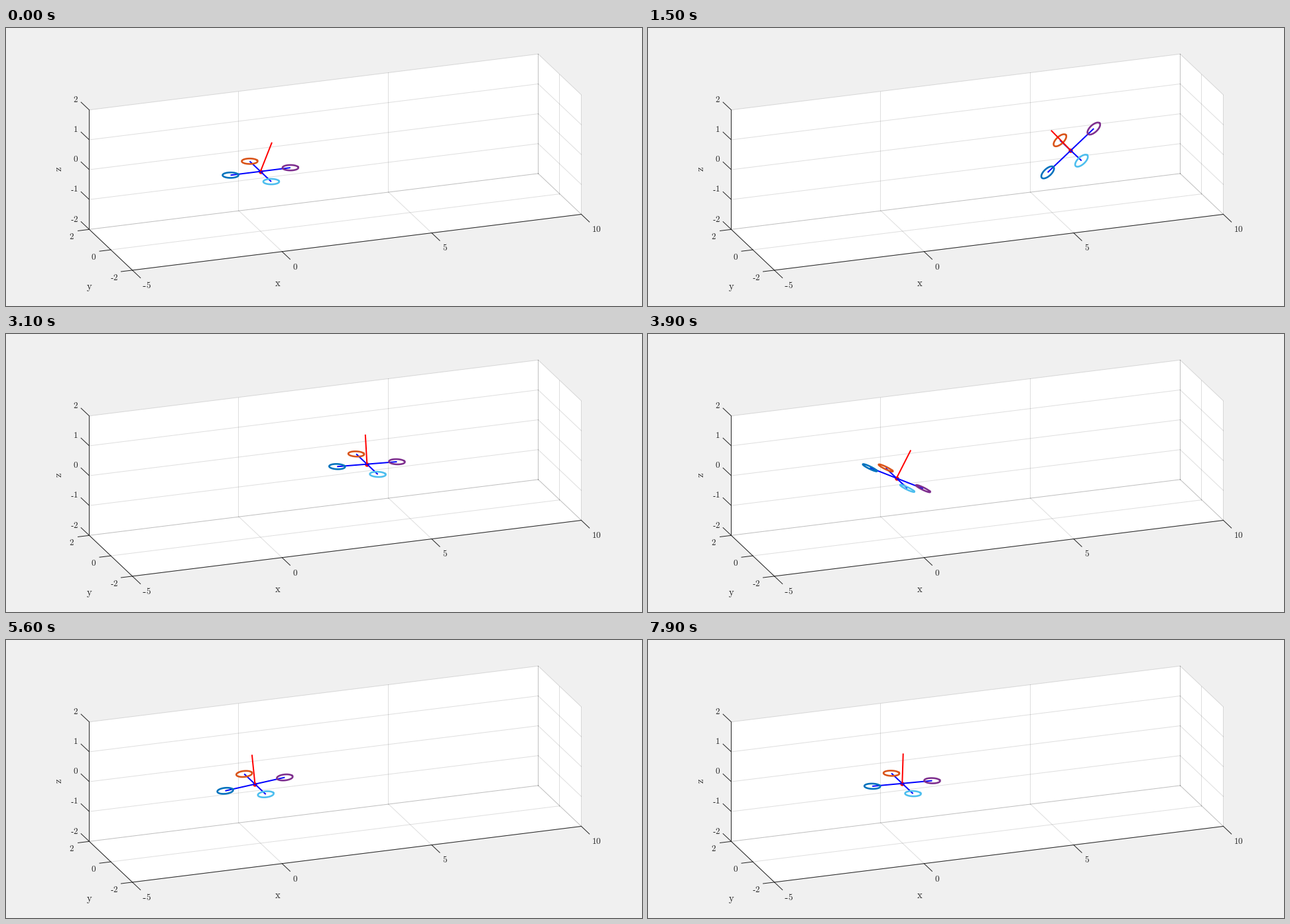
Animation of 959x420 px, one loop 8 s. Source, as a matplotlib script:

```python
import numpy as np
import matplotlib.pyplot as plt
from matplotlib.animation import FuncAnimation

W, H, DPI = 959, 420, 64
FRAMES, STEP = 80, 100
PX = 72 / DPI  # points per pixel

plt.rcParams["mathtext.fontset"] = "cm"

INK = "#262626"
GRID = (0.15, 0.15, 0.15, 0.15)
ORIGIN = np.array([383.7, 216.7])
AXES = np.array([[45.13, -5.63], [-16.25, -15.4], [0, -45.13]])


def project(points):
    """Orthographic view: (x, y, z) to stage pixels."""
    return ORIGIN + np.asarray(points, float) @ AXES


fig = plt.figure(figsize=(W / DPI, H / DPI), dpi=DPI, facecolor="#f0f0f0")
ax = fig.add_axes([0, 0, 1, 1])
ax.set(xlim=(0, W), ylim=(H, 0))
ax.axis("off")


def line(points, color, width, z=2, **kw):
    x, y = project(points).T
    if np.ptp(x) < 1e-6:
        x = x - 0.75  # upright lines snap down to whole pixels
    return ax.plot(x, y, color=color, lw=width * PX, zorder=z, **kw)[0]


def tick(start, delta):
    x, y = project(start)
    ax.plot([x, x + delta[0]], [y, y + delta[1]], color=INK, lw=PX, zorder=3)


def label(x, mid, value, align):
    """Number in roman type with a short hyphen as its sign."""
    size, base = 13.3, mid + 4.4
    digits = str(abs(value))
    if value < 0:
        if align == "left":
            x += 0.333 * size
            left = x
        else:
            left = x - 0.5 * size * len(digits)
        ax.plot([left - 4.3, left - 0.8], [base - 2.9] * 2, color=INK, lw=PX,
                solid_capstyle="butt")
    ax.text(x, base, rf"$\mathrm{{{digits}}}$", fontsize=size * PX, color=INK,
            ha=align, va="baseline")


# Panes
for pane in (
    [(-5, 2, -2), (10, 2, -2), (10, 2, 2), (-5, 2, 2)],
    [(-5, 2, -2), (10, 2, -2), (10, -2, -2), (-5, -2, -2)],
    [(10, 2, -2), (10, -2, -2), (10, -2, 2), (10, 2, 2)],
):
    ax.add_patch(plt.Polygon(project(pane), fc="white", ec="none", zorder=0))

# Grid, ticks and numbers
for x in range(-5, 11, 5):
    line([(x, 2, 2), (x, 2, -2)], GRID, 1)
    line([(x, 2, -2), (x, -2, -2)], GRID, 1)
    tick((x, -2, -2), (12.2, 11.6))
    label(431.9 + 45.15 * x, 360.2 - 5.62 * x, x, "left")
for y in range(-2, 3, 2):
    line([(-5, y, -2), (10, y, -2)], GRID, 1)
    line([(10, y, -2), (10, y, 2)], GRID, 1)
    tick((-5, y, -2), (-17, 2.1))
    label(135.8 - 16.4 * y, 345.2 - 15.5 * y, y, "right")
for z in range(-2, 3):
    line([(-5, 2, z), (10, 2, z)], GRID, 1)
    line([(10, 2, z), (10, -2, z)], GRID, 1)
    tick((-5, 2, z), (-12.4, -11.7))
    label(108.8, 197.8 - 45.2 * z, z, "right")

# Rulers
corners = [(-5, 2, 2), (-5, 2, -2), (-5, -2, -2), (10, -2, -2)]
for edge in zip(corners, corners[1:]):
    line(edge, INK, 1, 3)

name = dict(fontsize=14.7 * PX, color=INK, ha="center")
ax.text(410, 389.8, r"$\mathrm{x}$", va="baseline", **name)
ax.text(126, 394.8, r"$\mathrm{y}$", va="baseline", **name)
ax.text(79, 213.5, r"$\mathrm{z}$", va="center", rotation=90, **name)

# Flight: a fast dash out and back, then a damped swing about the start
DASH = [  # time, position, forward pitch in degrees
    (0, 0, 0), (0.45, 0.3, 55), (0.9, 1.99, 36.6), (1.35, 4.75, -25),
    (1.8, 7.04, -58.5), (2.2, 7.4, -57.3), (2.7, 5.76, -24), (3.1, 3.56, 2.5),
    (3.6, 0.95, 26), (4.0, -0.49, 27),
]
DECAY, OMEGA, LOW, LIFT = 0.69, 1.53, -1.16, 8.5


def swing(t):
    """Damped oscillation from its lowest point; pitch supplies the acceleration."""
    u = t - 4.5
    fade = LOW * np.exp(-DECAY * u)
    stiff = DECAY ** 2 + OMEGA ** 2
    x = fade * (np.cos(OMEGA * u) + DECAY / OMEGA * np.sin(OMEGA * u))
    v = -fade * stiff / OMEGA * np.sin(OMEGA * u)
    return t, x, np.degrees(np.arctan((-stiff * x - 2 * DECAY * v) / LIFT))


def smooth(t, value, now):
    """Cubic Hermite curve that starts at rest."""
    slope = np.gradient(value, t)
    slope[0] = 0
    i = np.searchsorted(t, now, side="right") - 1
    h = t[i + 1] - t[i]
    s = (now - t[i]) / h
    return ((1 + 2 * s) * (1 - s) ** 2 * value[i] + s * (1 - s) ** 2 * h * slope[i]
            + s * s * (3 - 2 * s) * value[i + 1] + s * s * (s - 1) * h * slope[i + 1])


times = np.arange(FRAMES) * STEP / 1000
knots, x_knots, pitch_knots = np.array(DASH + [swing(t) for t in np.arange(4.4, 8.4, 0.3)]).T
pos = smooth(knots, x_knots, times)
pitch = np.radians(smooth(knots, pitch_knots, times))

# Commanded thrust: limited PD control towards a goal, halfway filtered
goal = np.where(times < 1.25, 6.5, 0)
wanted = 2.3 * (goal - pos) - 1.6 * np.gradient(pos, times)
wanted = np.clip(np.arctan(wanted / 9.81), -np.pi / 4, np.pi / 4)
thrust = np.zeros(FRAMES)
for k in range(FRAMES):
    thrust[k] = (wanted[k] + (thrust[k - 1] if k else 0)) / 2

# Quadrotor
turn = np.linspace(0, 2 * np.pi, 61)
ring = 0.25 * np.column_stack([np.cos(turn), np.sin(turn), 0 * turn])
hubs = np.array([(-1, 0, 0), (0, 1, 0), (1, 0, 0), (0, -1, 0)])
colors = ["#0072bd", "#d95319", "#7e2f8e", "#4dbeee"]

blank = [(0, 0, 0)] * 2
dot = line(blank[:1], "#ff0000", 1, 4, marker="o", ms=6.4 * PX, mew=0)
arms = [line(blank, "#0000ff", 2, 5, solid_capstyle="butt") for _ in range(2)]
rotors = [line(blank, c, 2.6, 6) for c in colors]
arrow = line(blank, "#ff0000", 2, 7, solid_capstyle="butt")


def place(artist, points):
    artist.set_data(*project(points).T)


def update(k):
    center = np.array([pos[k], 0, 0])
    c, s = np.cos(pitch[k]), np.sin(pitch[k])
    body = np.array([[c, 0, -s], [0, 1, 0], [s, 0, c]])
    for rotor, hub in zip(rotors, hubs):
        place(rotor, center + (hub + ring) @ body)
    for i, arm in enumerate(arms):
        place(arm, center + hubs[i::2] @ body)
    place(arrow, [center, center + [np.sin(thrust[k]), 0, np.cos(thrust[k])]])
    place(dot, [center])
    return [dot, *arms, *rotors, arrow]


anim = FuncAnimation(fig, update, frames=FRAMES, interval=STEP, repeat=True,
                     repeat_delay=0, blit=False)
plt.show()
```
